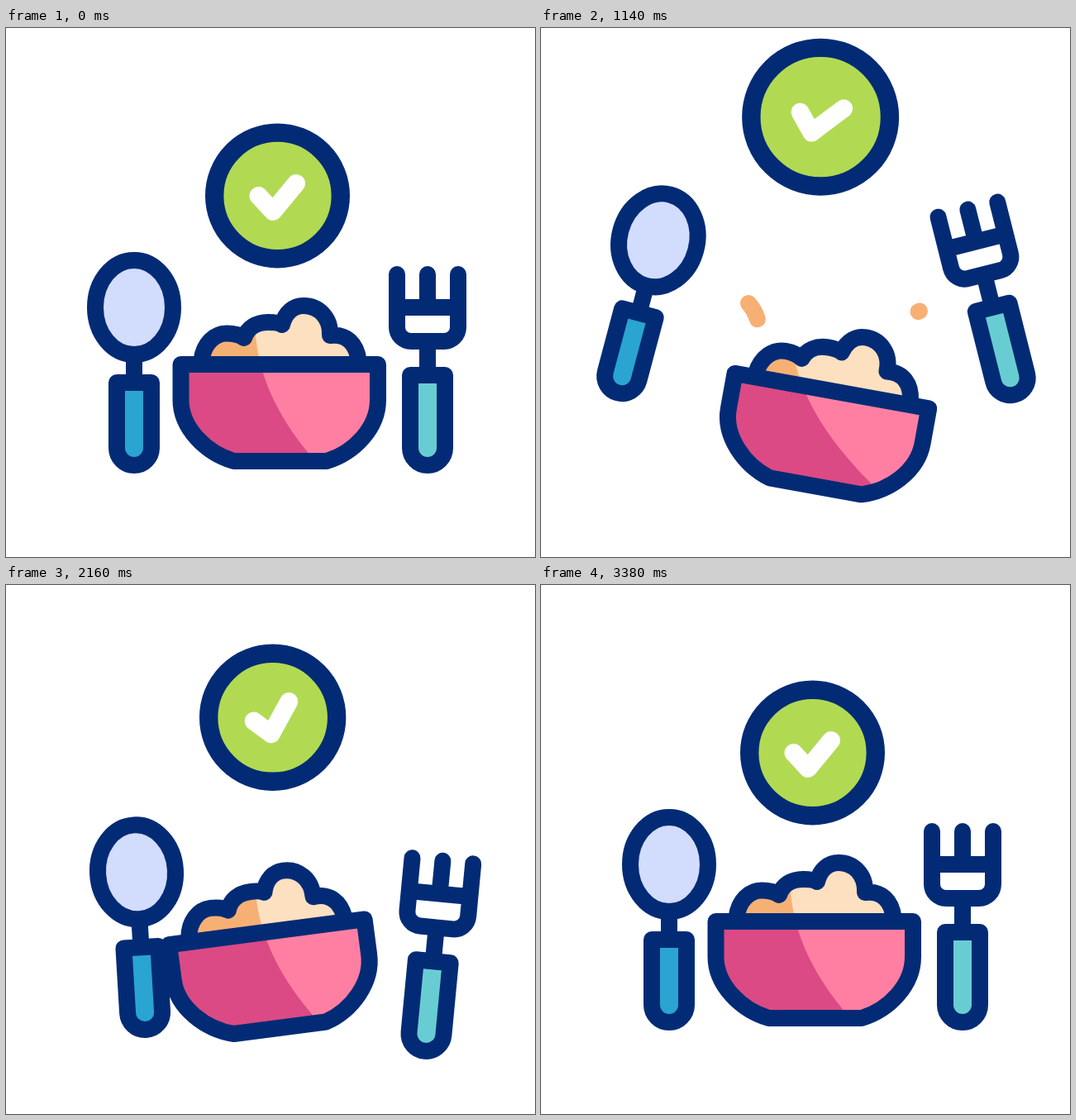
These frames come from a looping animation (640 px wide and 640 px high, 3600 ms). An HTML page with a canvas:

```html
<!DOCTYPE html>
<html lang="en">
<head>
<meta charset="utf-8">
<title>Healthy meal</title>
<style>
html, body { margin: 0; height: 100%; overflow: hidden; background: #fff; }
canvas { display: block; width: 640px; height: 640px; }
</style>
</head>
<body>
<canvas id="stage" width="640" height="640"></canvas>
<script>
const ctx = document.getElementById('stage').getContext('2d');
const LOOP = 3600, END = 3380;
const NAVY = '#032b75', ORANGE = '#f7b074';

const shape = d => new Path2D(d);
const bowl = shape('M211.5 407H450V450C450 484 421 514 388 524H275.5C242 514 211.5 484 211.5 450Z');
const food = shape('M236.5 402C239 382 252 369.5 267 369.5C275 369.5 283 371.5 288 375C292 363 303 356 317 356' +
  'C324 356 330 356.5 334 359C338 344 348 336 360 336C378 336 393 350 392 372C412 369.5 424 382 426.5 402');
const shade = shape('M301 330V350C301 420 330 490 425 575V640H150V330Z');
const spoonHead = shape('M108 338a47 57 0 1 0 94 0a47 57 0 1 0 -94 0Z');
const spoonNeck = shape('M155 395V429');
const spoonHandle = shape('M134 429H176V508A21 21 0 0 1 134 508Z');
const forkHead = shape('M473 298V362A17 17 0 0 0 490 379H530A17 17 0 0 0 547 362V298M510 298V338M473 338H547M510 379V420');
const forkHandle = shape('M489 420H531V508A21 21 0 0 1 489 508Z');
const tick = shape('M-23 0L-5.5 19L22.5 -15');
const leftCrumb = shape('M264 385Q268 352 251 333');
const rightCrumb = shape('M428 385Q434 354 458 342.5');

const clamp = v => Math.max(0, Math.min(1, v));

// Progress from one time to another, with soft ends
function ease(t, from, to) {
  const u = clamp((t - from) / (to - from));
  return 0.375 * (1 - Math.cos(Math.PI * u)) + 0.25 * u;
}

// Quick throw with a slow drift to the top, fall past rest, swing over, settle
function toss(t, height, { start = 0, pace = 1, drop = 1300, low = 2000, back = 0, settle = 3000, over = 0 }) {
  const age = (t - start) * pace;
  return height * (0.7 * ease(age, 0, 700) + 0.3 * ease(age, 0, 1300)
    + (back - 1) * ease(t, drop, low)
    + (over - back) * ease(t, low, settle)
    - over * ease(t, settle, END));
}

function ink(path, fill, width = 20) {
  if (fill) {
    ctx.fillStyle = fill;
    ctx.fill(path);
  }
  ctx.strokeStyle = NAVY;
  ctx.lineWidth = width;
  ctx.stroke(path);
}

// The shadow edge stays fixed on the stage while the part moves
function shaded(path, light, dark) {
  ctx.fillStyle = light;
  ctx.fill(path);
  ctx.save();
  ctx.clip(path);
  ctx.resetTransform();
  ctx.fillStyle = dark;
  ctx.fill(shade);
  ctx.restore();
  ink(path);
}

function posed(pivotX, pivotY, dx, dy, degrees, paint) {
  ctx.save();
  ctx.translate(pivotX + dx, pivotY + dy);
  ctx.rotate(degrees * Math.PI / 180);
  ctx.translate(-pivotX, -pivotY);
  paint();
  ctx.restore();
}

function drawBadge(t) {
  const x = 328.5 + toss(t, 10, { start: 560, pace: 1.8, low: 2100, back: -0.6 });
  const y = 203 - toss(t, 97, { low: 3050, back: -0.145, settle: 3370 });
  const angle = toss(t, 13.7, { back: -0.87, over: 0.18 });
  const scale = 1 + toss(t, 0.1, { low: 3000, back: -0.66, settle: END });
  const radius = 76.3 * scale;
  const disc = new Path2D();
  disc.arc(0, 0, radius, 0, 7);
  ctx.save();
  ctx.translate(x, y);
  ink(disc, '#b1da52', 22.4);
  ctx.rotate(angle * Math.PI / 180);
  ctx.scale(scale, scale);
  ctx.strokeStyle = '#fff';
  ctx.lineWidth = 22 / scale;
  ctx.stroke(tick);
  ctx.restore();
}

function drawCrumb(path, t, start) {
  const length = 56;
  const tail = length * clamp((t - start) / 172);
  const head = length * clamp((t - start + 150) / 172);
  if (head <= tail) return;
  ctx.save();
  ctx.strokeStyle = ORANGE;
  ctx.lineWidth = 20;
  ctx.setLineDash([head - tail, 999]);
  ctx.lineDashOffset = -tail;
  ctx.stroke(path);
  ctx.restore();
}

function drawBowl(t) {
  const dy = toss(t, 30.5, { pace: 1.1, drop: 1200, low: 2850 });
  const angle = toss(t, 10.4, { back: -0.8, over: 0.18 });
  posed(332, 526, 0, dy, angle, () => {
    shaded(food, '#fde0c0', ORANGE);
    shaded(bowl, '#ff7fa2', '#db4a84');
  });
}

function drawSpoon(t) {
  const dx = toss(t, -35, { pace: 1.6, drop: 1500, low: 2160, back: -0.23, settle: 2600 });
  const dy = toss(t, -84, { pace: 1.3, low: 1840, back: -0.21, settle: 2500 });
  const angle = toss(t, 14.9, { pace: 1.2, low: 1820, back: -0.62, settle: 2500, over: 0.16 });
  posed(155, 423, dx, dy, angle, () => {
    ink(spoonNeck);
    ink(spoonHead, '#d2dcfc');
    ink(spoonHandle, '#2aa4d0');
  });
}

function drawFork(t) {
  const dx = toss(t, 32, { pace: 1.6, drop: 1800, low: 2500, back: -0.41 });
  const dy = toss(t, -83, { drop: 1400, low: 2200, back: -0.45, settle: 2650 });
  const angle = toss(t, -14.4, { low: 2050, back: -0.41, over: 0.19 });
  posed(510, 403, dx, dy, angle, () => {
    ink(forkHead);
    ink(forkHandle, '#68cdd2');
  });
}

function draw(t) {
  ctx.fillStyle = '#fff';
  ctx.fillRect(0, 0, 640, 640);
  ctx.lineCap = ctx.lineJoin = 'round';
  drawBadge(t);
  drawCrumb(leftCrumb, t, 1040);
  drawCrumb(rightCrumb, t, 980);
  drawBowl(t);
  drawSpoon(t);
  drawFork(t);
}

const begin = performance.now();
function play() {
  draw((performance.now() - begin) % LOOP);
  requestAnimationFrame(play);
}
play();
</script>
</body>
</html>
```
